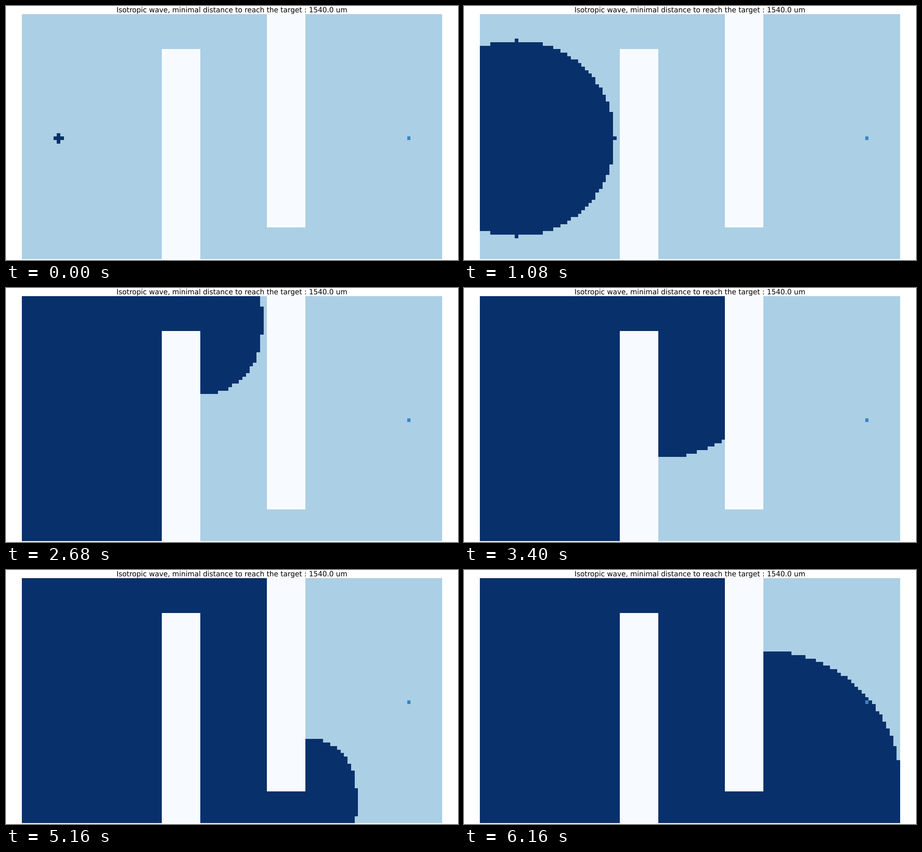
Write a matplotlib script that moves like this. It is 998 px wide and 561 px high and loops after 6200 ms.

```python
import matplotlib.pyplot as plt
import numpy as np
from matplotlib.animation import FuncAnimation

W, H, DPI = 998, 561, 64
FRAMES, INTERVAL = 155, 40
COLS, ROWS = 120, 70
WALL, FREE, TARGET, REACHED = range(4)

plt.rcParams["font.family"] = "DejaVu Sans"
plt.rcParams["text.hinting"] = "none"

y, x = np.mgrid[:ROWS, :COLS]
walls = ((x >= 40) & (x <= 50) & (y >= 10)) | ((x >= 70) & (x <= 80) & (y <= 60))
target = (x == 110) & (y == 35)


def wave(cx, cy, start, region):
    """Arrival time of a circular wave, limited to the cells it can see."""
    return np.where(region, start + np.hypot(x - cx, y - cy), np.inf)


# The wave leaves the start cell, then bends around each wall corner in turn.
in_sight = (x < 40) | (30 * (35 - y) >= 25 * (x - 10))
middle = x < 70
arrival = np.minimum.reduce([
    wave(10, 35, 0, in_sight & middle),
    wave(40, 10, 39, (x >= 40) & middle & (y < 10)),
    wave(50, 10, 50, (x > 50) & middle & (y >= 10)),
    wave(70, 60, 104, (x >= 70) & (y > 60)),
    wave(80, 60, 115, (x > 80) & (y <= 60)),
])


def grid_at(step):
    grid = np.where(arrival <= step + 1, REACHED, FREE)
    grid[walls] = WALL
    grid[target] = TARGET
    return grid


fig = plt.figure(figsize=(W / DPI, H / DPI), dpi=DPI, facecolor="white")
ax = fig.add_axes([0, 0, 1, 1])
ax.axis("off")
image = ax.imshow(grid_at(0), cmap="Blues", vmin=WALL, vmax=REACHED,
                  interpolation="nearest", aspect="auto",
                  extent=(35.2, 962.7, 559, 18.2))
ax.set_xlim(0, W)
ax.set_ylim(H, 0)
ax.text(W / 2, 14,
        "Isotropic wave, minimal distance to reach the target : 1540.0 um",
        ha="center", va="baseline", fontsize=15.63 * 72 / DPI, color="black")


def update(step):
    image.set_data(grid_at(step))
    return (image,)


anim = FuncAnimation(fig, update, frames=FRAMES, interval=INTERVAL,
                     repeat=True, repeat_delay=0)
plt.show()
```
